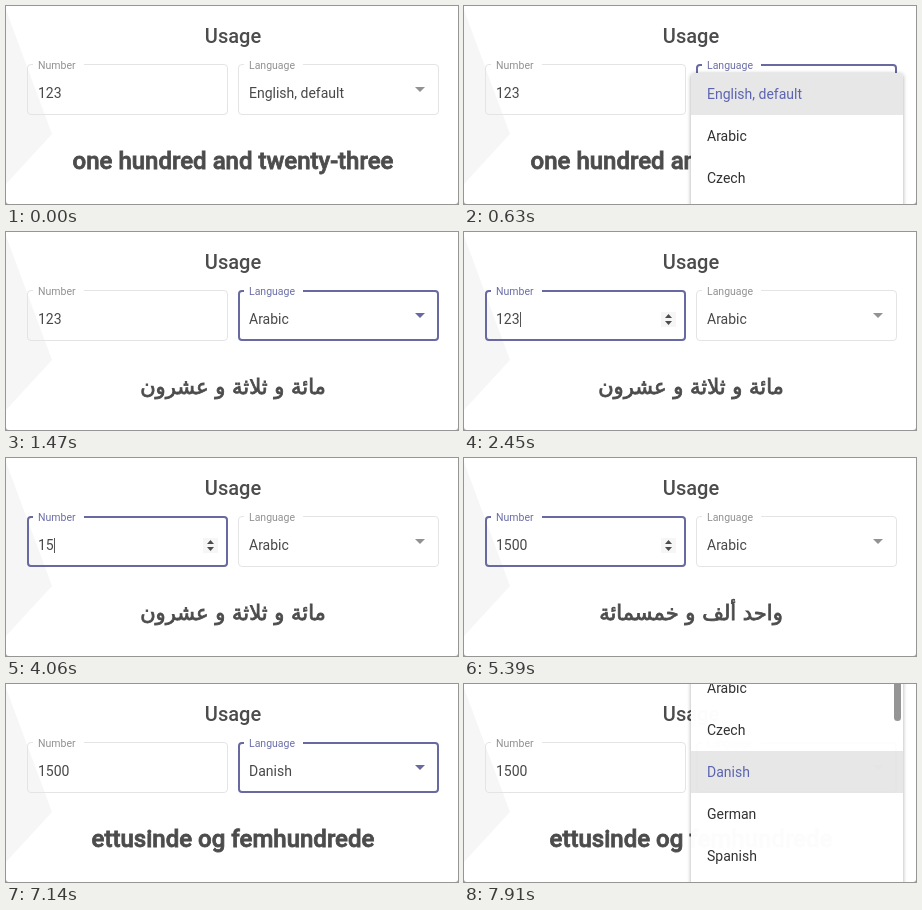
Recreate the animation shown at these times as an HTML page. Size 452x198 px, loop 8 s.

```html
<!DOCTYPE html>
<html lang="en">
<head>
<meta charset="utf-8">
<style>
  html, body { margin: 0; width: 100%; height: 100%; overflow: hidden; background: #aaa; }
  #stage { position: relative; width: 452px; height: 198px; overflow: hidden; background: #fff;
    border-radius: 0 0 3px 3px; font: 14px/20px Roboto, sans-serif; color: #484848; }
  #stage * { position: absolute; box-sizing: border-box; white-space: nowrap; }
  .backdrop { left: 0; top: 0; width: 46px; height: 178px; background: #f6f6f6;
    clip-path: polygon(0 4px, 100% 128px, 0 100%); }
  .title, .result { left: 0; width: 454px; text-align: center; color: #4c4c4c; font-weight: 500; }
  .title { top: 20px; font-size: 20px; }
  .result { top: 140px; font-size: 24px; line-height: 30px; -webkit-text-stroke: .8px #4c4c4c; }
  .result.arabic { font: 21px/30px "DejaVu Sans", sans-serif; }
  .field { top: 58px; width: 201px; height: 51px; border: 1px solid #e4e4e4; border-radius: 4px; }
  .label { top: 53px; height: 13px; padding: 0 8px 0 5px; background: #fff; color: #929292;
    font-size: 10.5px; line-height: 13px; }
  .focus .field { border: 2px solid #6769a0; }
  .focus .label { color: #6c6fa8; }
  .value { top: 77px; }
  .mark { background: #b4d5fe; left: 32px; top: 80px; width: 23px; height: 15px; }
  .caret { top: 80px; width: 1px; height: 15px; background: #555; }
  .spin { left: 197px; top: 80px; width: 15px; height: 15px; background: #f6f6f6; }
  .spin::before { content: ""; position: absolute; left: 4px; top: 2px; width: 7px; height: 11px; background: #4c4c4c;
    clip-path: polygon(50% 0, 100% 4px, 0 4px, 0 7px, 100% 7px, 50% 100%, 0 7px, 0 4px); }
  .arrow { left: 409px; top: 81px; width: 10px; height: 5px; background: #929292;
    clip-path: polygon(0 0, 100% 0, 50% 100%); }
  .focus .arrow { background: #6769a0; }
  .menu { left: 227px; width: 212px; background: #fff; border-radius: 4px; overflow: hidden; color: #303030;
    box-shadow: 0 1px 4px rgba(0, 0, 0, .35); }
  .item { left: 0; width: 212px; height: 42px; padding-left: 16px; line-height: 42px; overflow: hidden; }
  .item.selected { background: #e7e7e7; color: #5c64b2; }
  #stage .item span { position: relative; }
  .ripple { left: 91px; top: 24px; border-radius: 50%; background: #e4e4e4; transform: translate(-50%, -50%); }
  .thumb { left: 203px; top: 4px; width: 7px; height: 92px; border-radius: 4px; background: #949494; }
</style>
</head>
<body>
<div id="stage">
  <div class="backdrop"></div>
  <div class="title">Usage</div>
  <div id="number">
    <div class="field" style="left:21px"></div>
    <div class="label" style="left:27px">Number</div>
    <div class="mark"></div>
    <div class="value" style="left:32px"></div>
    <div class="caret"></div>
    <div class="spin"></div>
  </div>
  <div id="language">
    <div class="field" style="left:232px"></div>
    <div class="label" style="left:238px">Language</div>
    <div class="value" style="left:243px"></div>
    <div class="arrow"></div>
  </div>
  <div class="result"></div>
  <div class="menu"></div>
</div>
<script>
const LOOP = 8000, ROW = 42;
const languages = ['English, default', 'Arabic', 'Czech', 'Danish', 'German', 'Spanish', 'French', 'Farsi', 'Hebrew'];
const sessions = [
  { open: 390, press: 1170, close: 1270, selected: 0, pick: 1 },
  { open: 5430, press: 6910, close: 6950, selected: 1, pick: 3 },
  { open: 7690, press: Infinity, close: Infinity, selected: 3 },
];
// Each step: start time, value
const numbers = [[0, '123'], [3780, '1'], [4060, '15'], [4270, '150'], [4480, '1500']];
const results = [[0, 'one hundred and twenty-three'], [1320, 'مائة و ثلاثة و عشرون'],
  [4900, 'واحد ألف و خمسمائة'], [7030, 'ettusinde og femhundrede']];
const picked = [[0, 0], [1320, 1], [7030, 3]];
const focus = [[0, ''], [420, 'language'], [2170, 'number'], [5455, 'language']];

const $ = selector => document.querySelector(selector);
const at = (steps, t) => steps.filter(([start]) => start <= t).pop()[1];
const within = (t, a, b) => t >= a && t < b;
const show = (el, visible) => el.style.display = visible ? '' : 'none';
const setText = (el, text) => { if (el.textContent !== text) el.textContent = text; };

// cubic-bezier(.4, 0, .2, 1)
function ease(x) {
  if (x <= 0) return 0;
  if (x >= 1) return 1;
  let lo = 0, hi = 1;
  for (let i = 0; i < 20; i++) {
    const s = (lo + hi) / 2, r = 1 - s;
    if (1.2 * r * r * s + .6 * r * s * s + s ** 3 < x) lo = s; else hi = s;
  }
  return lo * lo * (3 - 2 * lo);
}

const menu = $('.menu');
const items = languages.map((name, i) => {
  const item = document.createElement('div');
  item.className = 'item';
  item.style.top = i * ROW + 'px';
  item.innerHTML = `<div class="ripple"></div><span>${name}</span>`;
  menu.append(item);
  return item;
});
menu.style.height = languages.length * ROW + 'px';
const thumb = document.createElement('div');
thumb.className = 'thumb';
menu.append(thumb);

function drawMenu(t) {
  const s = sessions.find(s => within(t, s.open, s.close + 200));
  show(menu, s);
  if (!s) return;
  const closing = (t - s.close) / 200, opening = t - s.open;
  const opacity = closing > 0 ? 1 - ease(closing) : ease(opening / 255);
  const grow = closing > 0 ? 1 - ease(closing * 1.5 - .5) : ease(opening / 207);
  menu.style.top = 67 - s.selected * ROW + 'px';
  menu.style.transformOrigin = `50% ${(s.selected + .5) * ROW}px`;
  menu.style.opacity = opacity;
  menu.style.transform = grow < 1 ? `scale(${.75 + .25 * grow}, ${.5625 + .4375 * grow})` : 'none';
  const size = Math.max(0, 134 * (t - s.press) / 90);
  items.forEach((item, i) => {
    item.classList.toggle('selected', i === s.selected);
    const ripple = item.firstChild;
    ripple.style.width = ripple.style.height = (i === s.pick ? size : 0) + 'px';
  });
  show(thumb, s.selected === 3);
}

function render(t) {
  const active = at(focus, t), number = at(numbers, t), selecting = within(t, 2870, 3780);
  for (const id of ['number', 'language']) $('#' + id).classList.toggle('focus', id === active);
  setText($('#number .value'), number);
  setText($('#language .value'), languages[at(picked, t)]);
  setText($('.result'), at(results, t));
  $('.result').classList.toggle('arabic', at(picked, t) === 1);
  show($('.mark'), selecting);
  show($('.spin'), active === 'number');
  show($('.caret'), active === 'number' && !selecting && t < 4970);
  $('.caret').style.left = Math.round(32.3 + number.length * 7.86) + 'px';
  drawMenu(t);
}

function tick() {
  render(performance.now() % LOOP);
  requestAnimationFrame(tick);
}
tick();
</script>
</body>
</html>
```
